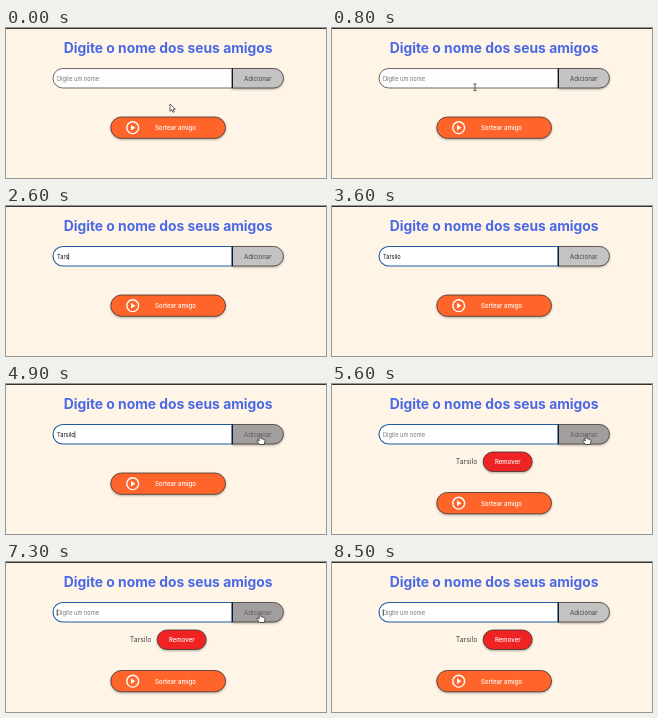
Recreate the animation shown at these times as an HTML page. Size 320x150 px, loop 8.6 s.

```html
<!DOCTYPE html>
<html lang="pt-BR">
<head>
<meta charset="utf-8">
<title>Amigo secreto</title>
<style>
  html, body { margin: 0; width: 100%; height: 100%; overflow: hidden; background: #fff5e7; }
  svg { display: block; width: 100%; height: 100%; font: 6.2px Inter, sans-serif; }
  .button { stroke: #3a302c; stroke-width: .75; filter: drop-shadow(0 1.3px 1.1px rgba(0, 0, 0, .32)); }
  .light { fill: #fff; font-size: 6.1px; font-weight: 500; }
  .cursor { stroke: #222; stroke-width: .7; stroke-linejoin: round; fill: #fff; }
</style>
</head>
<body>
<svg viewBox="0 0 320 150">
  <rect width="320" height="150" fill="#fff5e7"/>
  <rect width="320" height="1" fill="#35312e"/>
  <text x="162.1" y="25.1" text-anchor="middle" font-size="13.84" font-weight="700" fill="#4b69e5">Digite o nome dos seus amigos</text>

  <path id="add" class="button" d="M226.5 40.5H267.7a9.75 9.75 0 0 1 0 19.5H226.5Z"/>
  <text id="addLabel" x="251.8" y="52.5" text-anchor="middle">Adicionar</text>
  <path id="field" d="M226 40.5H56.75a9.75 9.75 0 0 0 0 19.5H226Z"/>
  <path d="M226.4 40.2V60.3" stroke="#111"/>
  <text id="placeholder" x="51" y="52.8" font-size="5.7" fill="#757575">Digite um nome</text>
  <text id="typed" x="51" y="52.8" font-size="5.7" fill="#111"></text>
  <rect id="caret" y="47.3" width=".7" height="6.6" fill="#111"/>

  <g id="item">
    <text id="friend" x="123.8" y="80" font-size="6.9" fill="#444"></text>
    <rect class="button" x="151.2" y="68" width="49" height="19.5" rx="9.75" fill="#ef2323"/>
    <text class="light" x="175.8" y="80" text-anchor="middle">Remover</text>
  </g>

  <g id="draw">
    <rect class="button" x="104.8" y="89" width="114.7" height="21.3" rx="10.65" fill="#ff652b"/>
    <circle cx="126.7" cy="99.7" r="5.9" fill="none" stroke="#fff" stroke-width="1.4"/>
    <path d="M125 96.8V102.6L129.4 99.7Z" fill="#fff"/>
    <text class="light" x="169.4" y="102.1" text-anchor="middle">Sortear amigo</text>
  </g>

  <g id="arrow" class="cursor"><path d="M0 0V7.3L1.8 5.7 3 8.3 4.2 7.8 3.1 5.2H5.4Z"/></g>
  <g id="beam" class="cursor"><path d="M-1.6-3.3H1.6M0-3.3V3.3M-1.6 3.3H1.6" fill="none"/></g>
  <g id="hand" class="cursor"><path d="M-.8.2Q0-.8.8.2V3.6L4.4 4.5Q5.2 4.9 5 6L4.2 9.5H-.6L-3.2 5.8Q-3.3 4.7-2.2 4.9L-.8 6Z"/></g>
</svg>
<script>
const LOOP = 8600, NAME = "Tarsilo";
const FOCUS = 1400, TYPE = 2200, KEY = 113, RETURN = 4000, CLICK = 5050, LEAVE = 7700;
const lastKey = TYPE + KEY * (NAME.length - 1);
const el = id => document.getElementById(id);
const show = (id, on) => el(id).setAttribute("visibility", on ? "visible" : "hidden");
const paint = (id, attrs) => Object.entries(attrs).forEach(([k, v]) => el(id).setAttribute(k, v));

el("friend").textContent = NAME;

function glide(t, start, end, from, to) {
  const p = Math.min(1, Math.max(0, (t - start) / (end - start)));
  const e = p * p * (3 - 2 * p);
  return from.map((v, i) => v + (to[i] - v) * e);
}

function pointer(t) {
  return t < RETURN
    ? glide(t, 300, 1200, [164, 76], [128, 47.5])
    : glide(t, RETURN, 4500, [128, 47.5], [254, 51]);
}

function render(t) {
  const focused = t >= FOCUS, added = t >= CLICK;
  const count = added || t < TYPE ? 0 : Math.min(NAME.length, Math.floor((t - TYPE) / KEY) + 1);
  el("typed").textContent = NAME.slice(0, count);
  show("placeholder", count === 0);

  const blinkStart = added ? CLICK : t < TYPE ? FOCUS : Math.min(t, lastKey);
  show("caret", focused && (t - blinkStart) % 1000 < 500);
  paint("caret", { x: 50.8 + (count ? el("typed").getComputedTextLength() : 0) });
  paint("field", {
    fill: focused ? "#fff" : "#fefcfd",
    stroke: focused ? "#1f5d9f" : "#3f3a38",
    "stroke-width": focused ? 1.15 : .75
  });

  const [x, y] = pointer(t);
  const visible = t < TYPE || (t >= RETURN && t < LEAVE);
  const overAdd = visible && x > 226;
  const overField = visible && !overAdd && y < 60;
  show("arrow", visible && !overAdd && !overField);
  show("beam", overField);
  show("hand", overAdd);
  for (const id of ["arrow", "beam", "hand"]) paint(id, { transform: `translate(${x} ${y})` });

  paint("add", { fill: overAdd ? "#a19e9d" : "#c4c2c2" });
  paint("addLabel", { fill: overAdd ? "#5f5c5b" : "#444" });
  show("item", added);
  paint("draw", { transform: `translate(0 ${added ? 19.5 : 0})` });
}

function tick() {
  render(performance.now() % LOOP);
  requestAnimationFrame(tick);
}
tick();
</script>
</body>
</html>
```
